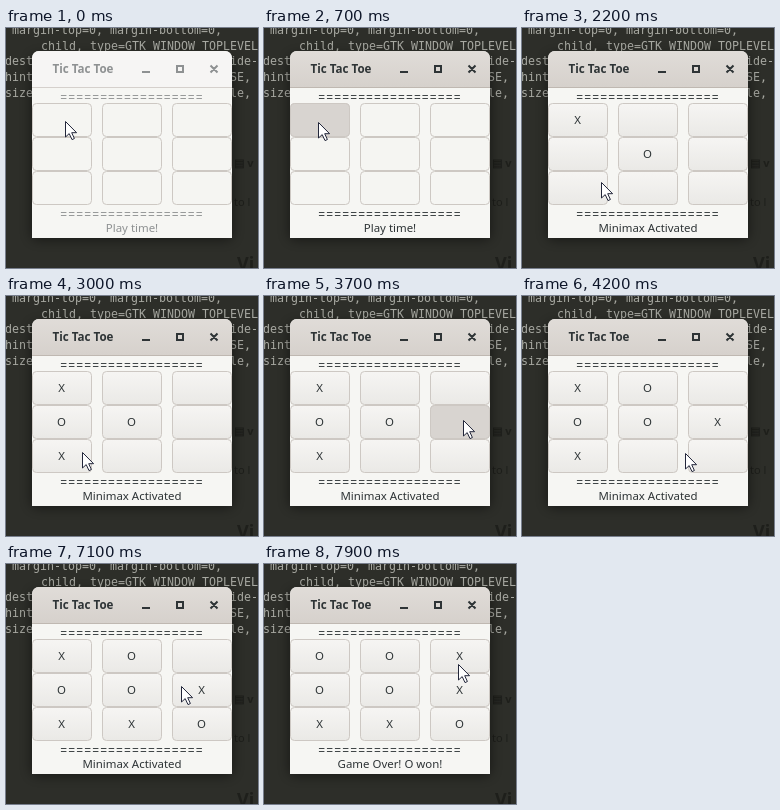
These frames come from a looping animation (252x240 px, 8 s). An HTML page:

```html
<!DOCTYPE html>
<html lang="en">
<head>
<meta charset="utf-8">
<title>Tic Tac Toe</title>
<style>
  html, body { margin: 0; width: 252px; height: 240px; overflow: hidden; background: #2d2e29; }
  svg { display: block; }
  text { white-space: pre; }
  .term { font: 11.63px "DejaVu Sans Mono", "Noto Sans Mono", monospace; fill: #a8a9a2; }
  .ghost { font-family: "Noto Sans", sans-serif; fill: #1e1f1b; }
  .ui { font: 11.45px "Noto Sans", "Open Sans", sans-serif; text-anchor: middle; fill: var(--ink); }
  .title { font-size: 11.6px; font-weight: 700; }
  .rule { font-size: 12px; letter-spacing: 1.1px; }
  .icon { fill: none; stroke: var(--ink); stroke-width: 2; }
  #win { --ink: #2e3436; }
  #win.idle { --ink: #8e9192; }
</style>
</head>
<body>
<svg id="stage" width="252" height="240" viewBox="0 0 252 240">
  <defs>
    <linearGradient id="bar" x2="0" y2="1">
      <stop stop-color="#e0dcd8"/><stop offset="1" stop-color="#d6d1cc"/>
    </linearGradient>
    <linearGradient id="key" x2="0" y2="1">
      <stop stop-color="#f6f5f3"/><stop offset="1" stop-color="#eae9e6"/>
    </linearGradient>
    <filter id="blur" x="-20%" y="-20%" width="140%" height="140%">
      <feGaussianBlur stdDeviation="6"/>
    </filter>
  </defs>
  <rect width="252" height="240" fill="#2d2e29"/>
  <g class="term">
    <text x="6" y="6">margin-top=0, margin-bottom=0,</text>
    <text x="35" y="22">child, type=GTK_WINDOW_TOPLEVEL</text>
    <text x="-1" y="37">dest</text><text x="224" y="37">ide-</text>
    <text x="-1" y="53">hint</text><text x="224" y="53">SE,</text>
    <text x="-1" y="69">size</text><text x="224" y="69">le,</text>
  </g>
  <g class="ghost">
    <text x="228" y="139" font-size="11" font-weight="700">▤ v</text>
    <text x="228" y="178" font-size="11">to l</text>
    <text x="231" y="242" font-size="18" font-weight="700">Vi</text>
  </g>
  <rect x="25" y="27" width="202" height="185" rx="7" fill="#000" opacity=".45" filter="url(#blur)"/>
  <g id="win">
    <path d="M26 210V30a7 7 0 0 1 7-7H219a7 7 0 0 1 7 7V210Z" fill="#f6f6f3"/>
    <path id="head" d="M26 59V30a7 7 0 0 1 7-7H219a7 7 0 0 1 7 7V59Z" fill="url(#bar)"/>
    <path id="edge" d="M26 59.5H226" stroke="#bfb8b1"/>
    <text class="ui title" x="77" y="45">Tic Tac Toe</text>
    <path class="icon" d="M136 44H144M171 38H177V44H171ZM204.5 37.5L211.5 44.5M211.5 37.5L204.5 44.5"/>
    <text class="ui rule" x="126" y="73.5">==================</text>
    <g id="board"></g>
    <text class="ui rule" x="126" y="190.5">==================</text>
    <text id="status" class="ui" x="126" y="204"></text>
  </g>
  <path id="cursor" d="M.5 .5V16L4.2 12.6L7 18.6L9.4 17.5L6.7 11.7H11.6Z"
        fill="#fff" stroke="#22263a" stroke-linejoin="round"/>
</svg>
<script>
const LOOP = 8000, STEP = 100, FADE = 200;
const FOCUS = 100, FIRST_MOVE = 800;
const $ = id => document.getElementById(id);

// time, x, y of the pointer tip
const path = [
  [0, 59, 93], [100, 59, 93], [500, 54, 94], [1000, 54, 94], [1900, 78, 146],
  [2200, 79, 154], [2600, 76, 156], [3000, 76, 156], [3600, 199, 124],
  [3900, 199, 124], [4200, 163, 157], [4500, 148, 162], [4800, 140, 162],
  [6800, 140, 162], [7300, 194, 100], [8000, 194, 100]
];
// cell, press, release
const presses = [[0, 300, FIRST_MOVE], [6, 2600, 2800], [5, 3700, 3900], [7, 6200, 6400], [2, 7500, 7700]];
// time, board
const boards = [
  [0, "         "], [FIRST_MOVE, "X   O    "], [2800, "X  OO X  "],
  [3900, "XO OOXX  "], [6400, "XO OOXXXO"], [7700, "OOXOOXXXO"]
];
const notes = [[0, "Play time!"], [FIRST_MOVE, "Minimax Activated"], [7700, "Game Over! O won!"]];

const latest = (list, t) => list.filter(e => e[0] <= t).pop()[1];

function add(tag, attrs) {
  const el = document.createElementNS("http://www.w3.org/2000/svg", tag);
  for (const k in attrs) el.setAttribute(k, attrs[k]);
  return $("board").appendChild(el);
}

const cells = Array.from({ length: 9 }, (_, i) => {
  const x = 26 + i % 3 * 70, y = 75 + Math.floor(i / 3) * 34;
  const box = { x: x + .5, y: y + .5, width: 59, height: 33, rx: 4, stroke: "#cdc8c3" };
  return {
    face: add("rect", box),
    dark: add("rect", { ...box, fill: "#d8d4d0" }),
    mark: add("text", { class: "ui", x: x + 29.5, y: y + 21 })
  };
});

function pointer(t) {
  const i = path.findIndex(p => p[0] > t);
  const [t0, x0, y0] = path[i - 1], [t1, x1, y1] = path[i];
  const k = (t - t0) / (t1 - t0), e = k * k * (3 - 2 * k);
  return [x0 + (x1 - x0) * e, y0 + (y1 - y0) * e].map(Math.round);
}

function pressure(cell, t) {
  const p = presses.find(e => e[0] === cell);
  if (!p || t < p[1]) return 0;
  return t < p[2] ? 1 : Math.max(0, 1 - (t - p[2]) / FADE);
}

function draw(t) {
  const idle = t < FOCUS, board = latest(boards, t);
  $("win").classList.toggle("idle", idle);
  $("head").setAttribute("fill", idle ? "#f6f5f4" : "url(#bar)");
  $("edge").setAttribute("stroke", idle ? "#d5d0cc" : "#bfb8b1");
  $("status").textContent = latest(notes, t);
  cells.forEach((c, i) => {
    // buttons stay flat until the first move is answered
    c.face.setAttribute("fill", t < FIRST_MOVE ? "#f5f5f2" : "url(#key)");
    c.dark.setAttribute("opacity", pressure(i, t));
    c.mark.textContent = board[i].trim();
  });
  $("cursor").setAttribute("transform", `translate(${pointer(t)})`);
}

const start = performance.now();
function tick() {
  const t = (performance.now() - start) % LOOP;
  draw(Math.floor(t / STEP) * STEP);
  requestAnimationFrame(tick);
}
tick();
</script>
</body>
</html>
```
